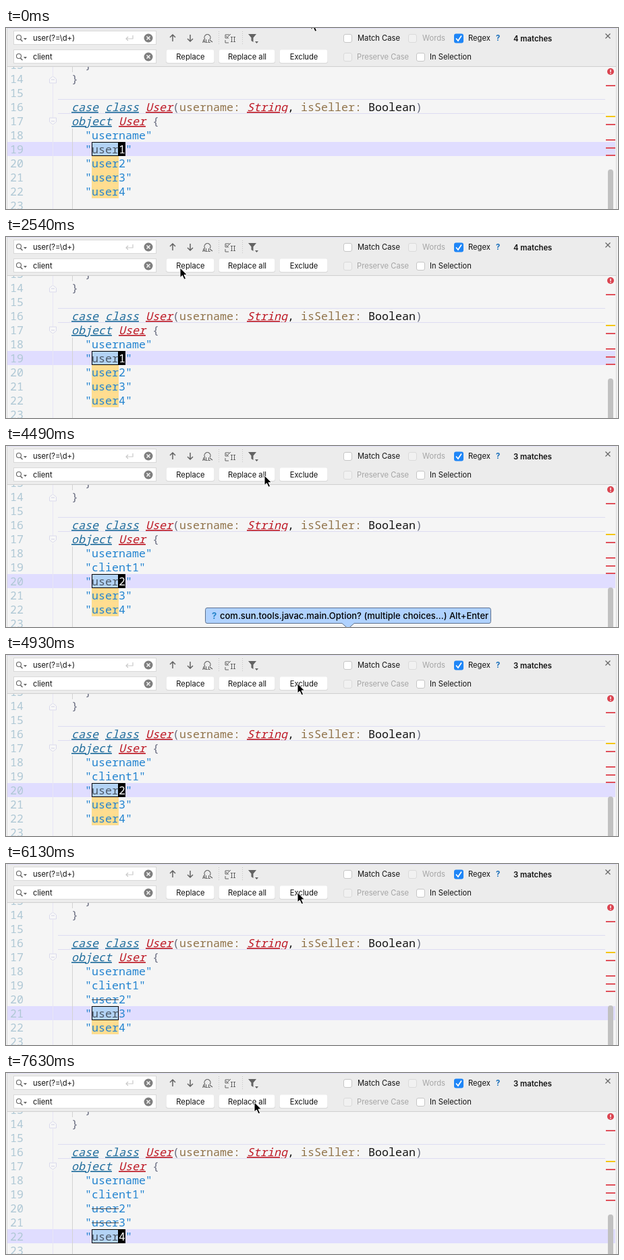
Write an HTML page that moves like this. It is 907 px wide and 270 px high and loops after 8 s.

```html
<!DOCTYPE html>
<html lang="en">
<head>
<meta charset="utf-8">
<title>Find and replace</title>
<style>
html, body { margin: 0; width: 100%; height: 100%; overflow: hidden; background: #f5f5f5; }
svg { display: block; }
text { white-space: pre; font: 11.2px Inter, "Open Sans", sans-serif; fill: #111; }
.code text { font: 300 16.65px "Noto Sans Mono", "Liberation Mono", monospace; }
.code .number { fill: #afc8d5; }
.code .keyword { fill: #1f6c9c; font-style: italic; text-decoration: underline 1px; }
.code .type { fill: #bd1824; font-style: italic; text-decoration: underline 1px; }
.code .param { fill: #91744b; }
.code .punct { fill: #696d80; }
.code .plain { fill: #111; }
.code .string { fill: #2384d0; }
.code .selected { fill: #4d5a68; }
.code .inverse { fill: #fff; }
.disabled { fill: #a5a5a5; }
.middle { text-anchor: middle; }
.icon { fill: none; stroke: #636363; stroke-width: 1.5; }
</style>
</head>
<body>
<svg width="907" height="270" viewBox="0 0 907 270">
  <rect width="907" height="270" fill="#f5f5f5"/>
  <g id="rows" class="code"></g>
  <g id="gutter"></g>
  <g id="toolbar"></g>
  <g id="overlay"></g>
</svg>
<script>
const LOOP = 8000;
const STEP = 150;
const COLUMN = 10;
const ROW = 21;
const layer = id => document.getElementById(id);
const rowTop = row => 170 + (row - 19) * ROW;
const baseline = row => 124 + (row - 16) * ROW;
const rect = (x, y, w, h, fill, extra = '') =>
  `<rect x="${x}" y="${y}" width="${w}" height="${h}" fill="${fill}" ${extra}/>`;
const path = (d, extra) => `<path d="${d}" ${extra}/>`;
const label = (x, y, text, extra = '') => `<text x="${x}" y="${y}" ${extra}>${text}</text>`;
const code = (row, column, text, style) =>
  label(97 + column * COLUMN, baseline(row), text, `class="${style}"`);

const header = [
  [16, 0, 'case', 'keyword'], [16, 5, 'class', 'keyword'], [16, 11, 'User', 'type'],
  [16, 15, '(', 'punct'], [16, 16, 'username:', 'param'], [16, 26, 'String', 'type'],
  [16, 32, ',', 'plain'], [16, 34, 'isSeller:', 'param'], [16, 44, 'Boolean', 'plain'],
  [16, 51, ')', 'punct'], [17, 0, 'object', 'keyword'], [17, 7, 'User', 'type'],
  [17, 12, '{', 'punct'], [13, 2, '}', 'punct'], [14, 0, '}', 'punct'],
  [18, 2, '"username"', 'string']
].map(args => code(...args)).join('');

const numbers = Array.from({ length: 11 }, (_, i) =>
  label(6, baseline(13 + i), 13 + i, 'class="number"')).join('');

function drawGutter() {
  const fold = (y, flip) => path(`M64.5 ${y - 5 * flip}h10v${6 * flip}l-5 ${4 * flip}l-5 ${-4 * flip}z`,
    'fill="#f8f8f8" stroke="#dadaec"') + path(`M67 ${y}h5`, 'stroke="#d0d0e4"');
  const mark = (y, color) => rect(889, y - 1, 14, 2, color);
  layer('gutter').innerHTML =
    path('M69.5 57V71M69.5 83V134M69.5 146V270', 'stroke="#e7e5f5"') +
    path('M98.5 57V66M98.5 150V270', 'stroke="#d3d3d3"') +
    path('M77 106.5H888M77 127.5H888', 'stroke="#dddcf2" fill="none"') +
    fold(77, -1) + fold(139, 1) +
    [86, 144, 167, 179, 190].map(y => mark(y, '#e0505a')).join('') + mark(132, '#f3c614') +
    rect(892, 211, 8, 70, '#c1c1c1', 'rx="4"') +
    rect(0, 0, 1, 270, '#fafafa') + rect(1, 0, 1, 270, '#d5d5d5') +
    rect(904, 0, 1, 270, '#d8d8d8') + rect(905, 0, 2, 270, '#f3f3f3');
}

function drawToolbar() {
  const field = (y, text) =>
    rect(11.5, y - 10.5, 211, 20, '#fff', 'stroke="#d9d9d9"') +
    `<circle cx="19" cy="${y - 1}" r="3.5" class="icon" style="stroke-width:1.1"/>` +
    path(`M21.5 ${y + 2}l3 3`, 'class="icon"') + path(`M26 ${y}h5l-2.5 3z`, 'fill="#666"') +
    label(40, y + 4, text) +
    `<circle cx="211" cy="${y}" r="6.5" fill="#7f7f7f"/>` +
    path(`M208.5 ${y - 2.5}l5 5m0 -5l-5 5`, 'stroke="#fff" stroke-width="1.4"');
  const button = (x, w, text) =>
    rect(x, 33, w, 20, '#d8d8d8', 'rx="3"') + rect(x + .5, 32.5, w - 1, 19.5, '#fff', 'rx="3"') +
    label(x + w / 2 + .5, 46.5, text, 'class="middle"');
  const checkbox = (x, y, textX, text, style = '') =>
    rect(x + .5, y - 5.5, 12, 12, style ? '#f1f1f1' : '#fff',
      `rx="2.5" stroke="${style ? '#dadada' : '#c6c6c6'}"`) +
    label(textX, y + 4, text, `class="${style}"`);
  const arrow = (x, dir) =>
    path(`M${x} ${15 + 5 * dir}V${15 - 5 * dir}M${x - 4} ${15 + dir}l4 ${4 * dir}l4 ${-4 * dir}`, 'class="icon"');

  layer('toolbar').innerHTML =
    rect(2, 0, 902, 57, '#ececec') + rect(2, 0, 902, 1, '#e0def5') + rect(2, 57, 902, 1, '#cfcfcf') +
    field(15, 'user(?=\\d+)') + field(43, 'client') +
    path('M188 11v5h-10m3 -3l-3 3l3 3', 'class="icon" style="stroke:#c9c9c9;stroke-width:1.2"') +
    arrow(247, -1) + arrow(273, 1) +
    path('M295 17a4.5 4.5 0 1 1 7 0M302 18l4 3', 'class="icon" style="stroke-width:1.2"') +
    label(291, 22, 'ALL', 'style="font-size:6.5px;font-weight:700;fill:#555"') +
    path('M315.5 5V26M350.5 5V26', 'stroke="#c4c4c4" stroke-dasharray="1 2"') +
    path('M331 10h-6v5h5M326 12l2 2l5 -5M325 18v4h5M333 13.5h3m-1.5 0v7m-1.5 0h3m1 -7h3m-1.5 0v7m-1.5 0h3',
      'class="icon" style="stroke-width:1"') +
    path('M359 9h12l-4.5 5.5v6.5l-3 -2v-4.5zM369 20h5l-2.5 3z', 'fill="#636363"') +
    button(237, 72, 'Replace') + button(315, 84, 'Replace all') + button(405, 72, 'Exclude') +
    checkbox(500, 15, 521, 'Match Case') + checkbox(596, 15, 617, 'Words', 'disabled') +
    checkbox(664, 15, 685, 'Regex') + rect(664, 8.5, 14, 14, '#1f86f7', 'rx="3"') +
    path('M667 15.5l3 3.5l5 -7.5', 'fill="none" stroke="#fff" stroke-width="1.7"') +
    label(726, 19, '?', 'style="font-weight:700;fill:#176db9"') +
    checkbox(500, 43, 520, 'Preserve Case', 'disabled') + checkbox(608, 43, 628, 'In Selection') +
    path('M888.5 8.5l7 7m0 -7l-7 7', 'class="icon" style="stroke-width:1.2"');
}

// [first step, number of steps, from x, from y, to x, to y]
const moves = [
  [150, 4, 452, -12, 272, 58],
  [1950, 3, 272, 58, 258, 46],
  [3890, 4, 258, 46, 383, 44],
  [4780, 1, 383, 44, 432, 42.5],
  [6880, 4, 432, 42.5, 368, 43.5]
];

function pointerAt(t) {
  const [start, steps, x0, y0, x1, y1] = moves.findLast(m => t >= m[0]) || moves[0];
  const k = Math.max(0, Math.min(1, (Math.floor((t - start) / STEP) + 1) / steps));
  const eased = k * k * (3 - 2 * k);
  return [x0 + (x1 - x0) * eased, y0 + (y1 - y0) * eased];
}

const caretHidden = [[150, 600], [1050, 1650], [2100, 2540], [3740, 4190], [4780, 4930], [6130, 6580], [7180, 7630]];
const between = (t, [from, to]) => t >= from && t < to;

function userRow(row, current, caret) {
  const digit = row - 18;
  if (row === 19 && current > 19) return code(row, 2, '"client1"', 'string');
  const top = rowTop(row);
  const active = row === current;
  const inverse = active && caret;
  let out = '';
  if (active) out += rect(127.5, top + .5, 39, 20, '#b3d3f5', 'stroke="#000"');
  else if (row > current) out += rect(127, top, 40, ROW, '#ffdd90');
  if (inverse) out += rect(167, top, 10, ROW, '#000');
  out += code(row, 2, '"', 'string') + code(row, 3, 'user', active ? 'selected' : 'string') +
    code(row, 7, digit, inverse ? 'inverse' : 'string') + code(row, 8, '"', 'string');
  if (row < current) out += rect(127, top + 11, 40, 1, '#3f4850');
  return out;
}

function drawRows(current, caret) {
  return rect(2, rowTop(current), 901, ROW, '#e0ddff') + numbers + header +
    [19, 20, 21, 22].map(row => userRow(row, current, caret)).join('');
}

const eye = path('M890.5 65q5.5 -6 11 0q-5.5 6 -11 0z', 'fill="none" stroke="#6b6b6b" stroke-width="1.2"') +
  '<circle cx="896" cy="65" r="2" fill="#6b6b6b"/>';
const errorBadge = '<circle cx="896" cy="65" r="5" fill="#db4450"/>' +
  rect(895.3, 62, 1.4, 4, '#fff') + rect(895.3, 67, 1.4, 1.4, '#fff');
const tooltip =
  path('M298 241.5H716q2.5 0 2.5 3V261.5q0 3 -2.5 3H516l-9 8l-9 -8H298q-2.5 0 -2.5 -3V244.5q0 -3 2.5 -3z',
    'fill="#b0d2ff" stroke="#5d718f"') +
  label(305, 258, '?', 'style="font-size:13px;font-weight:700;fill:#2583c9"') +
  label(317, 258, 'com.sun.tools.javac.main.Option? (multiple choices...) Alt+Enter',
    'style="font-size:13px;font-weight:500;fill:#000"');

function drawOverlay(t) {
  const [x, y] = pointerAt(t);
  return (between(t, [3140, 4040]) ? eye : errorBadge) +
    (between(t, [4190, 4930]) ? tooltip : '') +
    label(752, 20, `${t < 3140 ? 4 : 3} matches`, 'style="font-weight:600;font-size:11.3px"') +
    path('M0 0V14.5L3.4 11.5L6 17.3L8.6 16.2L6 10.5H10.5Z',
      `transform="translate(${x} ${y})" fill="#000" stroke="#fff"`);
}

const shown = {};
function update(id, markup) {
  if (shown[id] !== markup) layer(id).innerHTML = shown[id] = markup;
}

function frame() {
  const t = performance.now() % LOOP;
  const current = 19 + [3140, 5230, 6580].filter(start => t >= start).length;
  const caret = !caretHidden.some(span => between(t, span));
  update('rows', drawRows(current, caret));
  update('overlay', drawOverlay(t));
  requestAnimationFrame(frame);
}

drawGutter();
drawToolbar();
frame();
</script>
</body>
</html>
```
